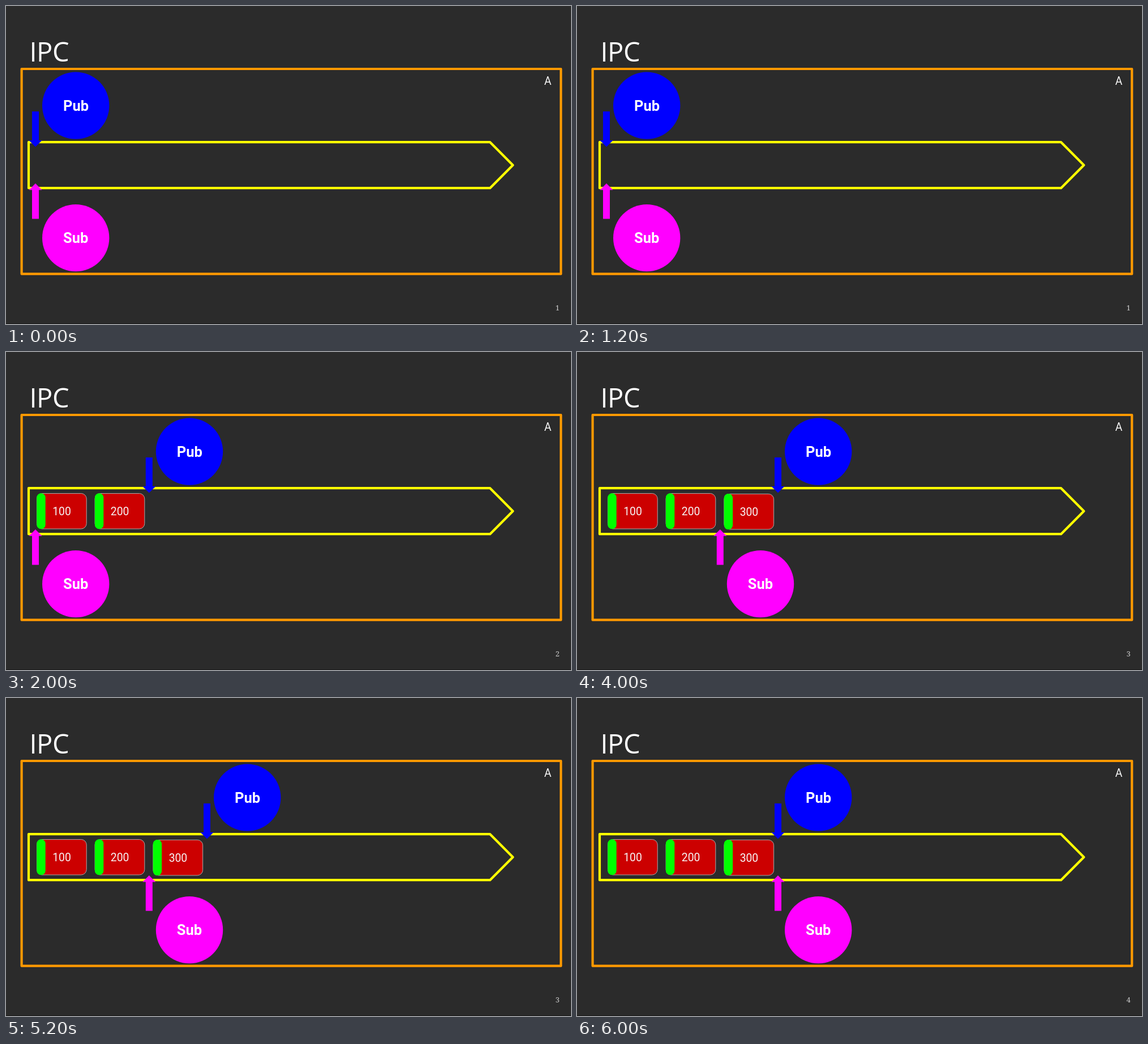
These frames come from a looping animation (998x561 px, 8 s). An HTML page:

```html
<!DOCTYPE html>
<html lang="en">
<head>
<meta charset="utf-8">
<title>IPC</title>
<style>
  html, body { margin: 0; width: 100%; height: 100%; overflow: hidden; background: #2b2b2b; }
  svg { display: block; width: 998px; height: 561px; }
  text { font-family: Roboto, sans-serif; fill: #fff; text-anchor: middle; }
  .title { font: 500 47px "Open Sans", sans-serif; font-stretch: 75%; letter-spacing: -0.5px; text-anchor: start; }
  .name { font-size: 25.5px; font-weight: 700; }
  .num { font-size: 19.3px; fill: #f6f6f6; }
  .page { font: 13px "Noto Serif", serif; fill: #ccc; text-anchor: end; }
  .line { fill: none; stroke-width: 4.2; stroke-linejoin: round; }
</style>
</head>
<body>
<svg viewBox="0 0 998 561">
  <defs>
    <g id="card">
      <rect x="54.5" y="249.5" width="87.7" height="62.5" rx="9.5" fill="#c00" stroke="#aaa"/>
      <rect x="54.3" y="249.2" width="15.4" height="63" rx="7.5" fill="#0f0"/>
    </g>
  </defs>
  <rect width="998" height="561" fill="#2b2b2b"/>
  <rect y="560" width="998" height="1" fill="#181818"/>
  <text class="title" x="41.5" y="98">IPC</text>
  <rect class="line" x="27.6" y="111" width="952.6" height="361.7" stroke="#f90"/>
  <text class="num" x="957" y="139.3">A</text>
  <path class="line" d="M40 240.2H855L895.3 280.7L855 321.2H40Z" stroke="#ff0"/>
  <g id="cards"></g>
  <g id="pub">
    <path d="M46 186H58V237H63.5L52 248.5L40.5 237H46Z" fill="#00f"/>
    <circle cx="123.2" cy="175.6" r="59.2" fill="#00f"/>
    <text class="name" x="123.5" y="184.8">Pub</text>
  </g>
  <g id="sub">
    <path d="M46 375.6H58V324.5H63.5L52 313L40.5 324.5H46Z" fill="#f0f"/>
    <circle cx="123.2" cy="409.1" r="59.2" fill="#f0f"/>
    <text class="name" x="123.2" y="418.3">Sub</text>
  </g>
  <text class="page" id="page" x="977.7" y="537">1</text>
</svg>
<script>
const HOLD = 2000;
const steps = [
  { pub: 0, sub: 0, cards: 0 },
  { pub: 200.8, sub: 0, cards: 2 },
  { pub: 303, sub: 200.8, cards: 3 },
  { pub: 303, sub: 303, cards: 3 }
];
const cardSpots = [[0, 0], [102.6, 0], [205.4, 0.9]];
const byId = id => document.getElementById(id);

byId("cards").innerHTML = cardSpots.map(([x, y], i) =>
  `<g transform="translate(${x} ${y})"><use href="#card"/>` +
  `<text class="num" x="98.5" y="287.8">${(i + 1) * 100}</text></g>`).join("");

const cards = [...byId("cards").children];
const slide = (id, x) => byId(id).setAttribute("transform", `translate(${x} 0)`);
let shown = -1;

function show(i) {
  const step = steps[i];
  slide("pub", step.pub);
  slide("sub", step.sub);
  cards.forEach((card, n) => card.setAttribute("visibility", n < step.cards ? "visible" : "hidden"));
  byId("page").textContent = i + 1;
  shown = i;
}

const start = performance.now();
function tick() {
  const i = Math.floor((performance.now() - start) / HOLD) % steps.length;
  if (i !== shown) show(i);
  requestAnimationFrame(tick);
}
show(0);
requestAnimationFrame(tick);
</script>
</body>
</html>
```
